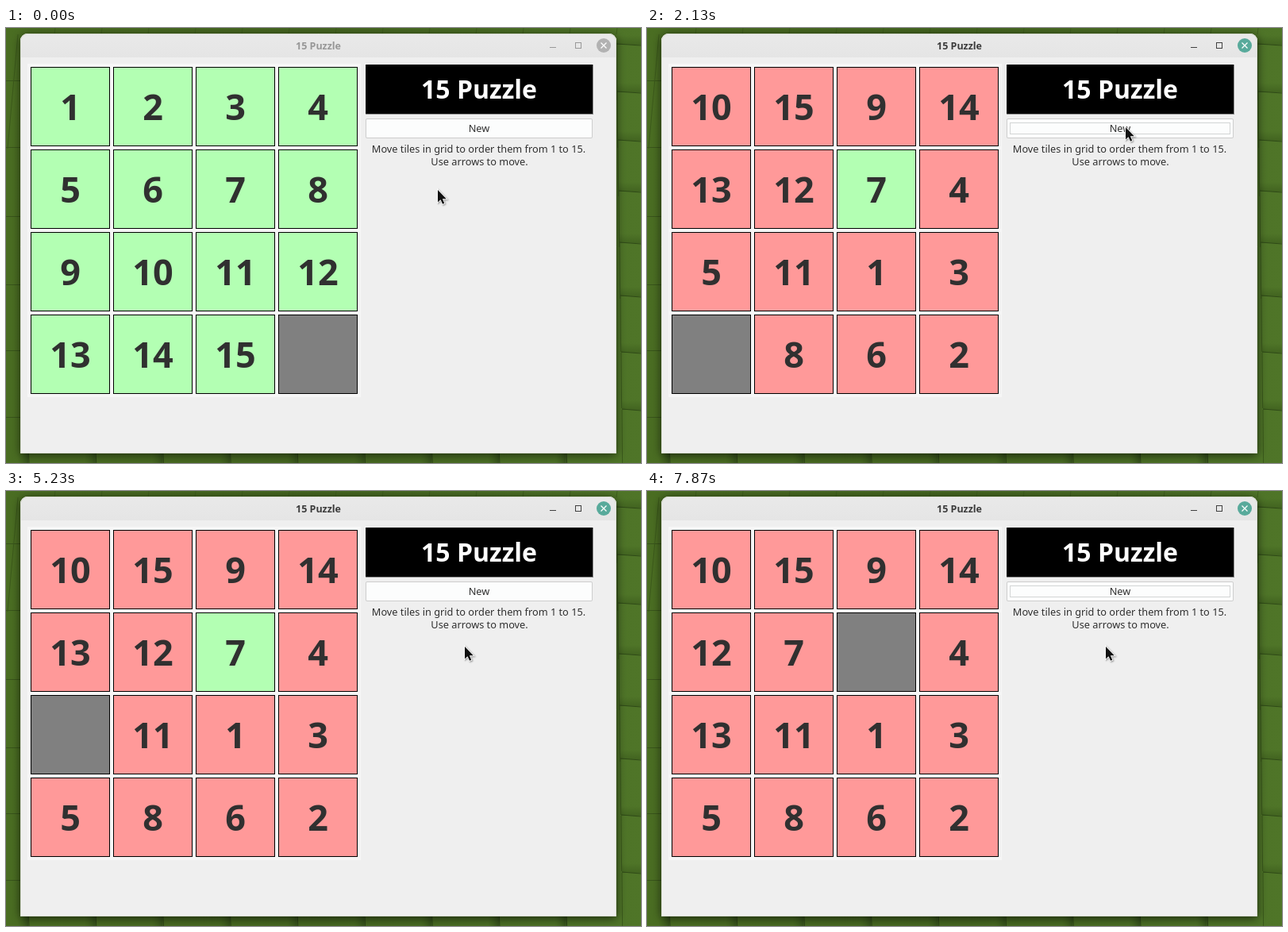
An HTML page with a canvas for the animation above (8 s loop, 800 by 548 pixels).

```html
<!DOCTYPE html>
<html lang="en">
<head>
<meta charset="utf-8">
<title>15 Puzzle</title>
<style>
  html, body { margin: 0; width: 100%; height: 100%; overflow: hidden; }
  canvas { display: block; }
</style>
</head>
<body>
<canvas id="stage" width="800" height="548"></canvas>
<script>
const ctx = document.getElementById('stage').getContext('2d');
const LOOP = 8000, ACTIVATE = 1970, SHUFFLE = 2130;
const FONT = '"Noto Sans", "Open Sans", sans-serif';

const SOLVED = [1, 2, 3, 4, 5, 6, 7, 8, 9, 10, 11, 12, 13, 14, 15, 0];
const SHUFFLED = [10, 15, 9, 14, 13, 12, 7, 4, 5, 11, 1, 3, 0, 8, 6, 2];
// Time of each move and the cell the gap goes to.
const MOVES = [[5230, 8], [6230, 4], [6830, 5], [7870, 6]];

// Pointer strokes: start time, end time, steps, from, to, easing.
const smooth = p => p * p * (3 - 2 * p);
const linear = p => p;
const STROKES = [
  [400, 870, 15, [543, 203], [599, 82], smooth],
  [1100, 1370, 9, [599, 82], [602, 124], linear],
  [2700, 2930, 7, [602, 124], [577, 195], smooth]
];

function rect(x, y, w, h, fill) {
  ctx.fillStyle = fill;
  ctx.fillRect(x, y, w, h);
}

function outline(x, y, w, h, color) {
  ctx.strokeStyle = color;
  ctx.lineWidth = 1;
  ctx.strokeRect(x + .5, y + .5, w - 1, h - 1);
}

function line(x1, y1, x2, y2, color, width = 1) {
  ctx.strokeStyle = color;
  ctx.lineWidth = width;
  ctx.beginPath();
  ctx.moveTo(x1, y1);
  ctx.lineTo(x2, y2);
  ctx.stroke();
}

function text(str, x, y, size, color, weight = 400) {
  ctx.font = `${weight} ${size}px ${FONT}`;
  ctx.textAlign = 'center';
  ctx.fillStyle = color;
  ctx.fillText(str, x, y);
}

function roundRect(x, y, w, h, radii, fill) {
  ctx.beginPath();
  ctx.roundRect(x, y, w, h, radii);
  ctx.fillStyle = fill;
  ctx.fill();
}

function gradient(x1, y1, x2, y2, ...colors) {
  const g = ctx.createLinearGradient(x1, y1, x2, y2);
  colors.forEach((c, i) => g.addColorStop(i / (colors.length - 1), c));
  return g;
}

function drawWallpaper() {
  rect(0, 0, 800, 548, gradient(0, 0, 800, 0, '#4a6d22', '#456620', '#4f7528'));
  [66, 150, 237, 323, 406, 490].forEach(y => line(0, y + .5, 20, y + .5, '#38541a'));
  line(15, 8, 2, 152, '#3c5a1b');
  for (let x = 28; x < 790; x += 84.7) {
    rect(x - 14, 534, 14, 14, gradient(x - 14, 0, x, 0, '#3f601d00', '#34501a'));
    line(x + .5, 534, x + 1, 548, '#2b4215');
  }
  for (let x = 62; x < 780; x += 59) line(x, 0, x - 1, 8, '#3f5f1d');
  [21, 81, 142, 206, 271, 338, 409, 481].forEach((y, i) => {
    const x = 769 + i;
    rect(x, y - 12, 800 - x, 12, gradient(0, y - 12, 0, y, '#426420' + '00', '#426420'));
    line(x, y - 1, 800, y + 1, '#2f4a17');
    line(x, y, x + .6, y + 70, '#3a591b');
  });
}

function drawWindow(active) {
  ctx.save();
  ctx.shadowColor = active ? '#000a' : '#0009';
  ctx.shadowBlur = 12;
  ctx.shadowOffsetY = 2;
  roundRect(18, 7, 751, 529, [9, 9, 1, 1], '#efefef');
  ctx.restore();
  roundRect(18, 7, 751, 30, [9, 9, 0, 0], gradient(0, 7, 0, 37, '#e9e9e9', '#e5e5e5'));
  ctx.beginPath();
  ctx.roundRect(18.5, 7.5, 750, 528, [9, 9, 1, 1]);
  ctx.strokeStyle = '#d6dacf';
  ctx.lineWidth = 1;
  ctx.stroke();

  const icon = active ? '#404040' : '#999';
  text('15 Puzzle', 393.5, 27, 12.5, active ? '#3c3c3c' : '#979797', 700);
  rect(685, 24, 8, 1, icon);
  outline(717, 18, 8, 8, icon);
  ctx.beginPath();
  ctx.arc(753, 22, 9, 0, 2 * Math.PI);
  ctx.fillStyle = active ? '#58aa9b' : '#b2b2b2';
  ctx.fill();
  line(749.5, 18.5, 756.5, 25.5, '#fff', 1.3);
  line(756.5, 18.5, 749.5, 25.5, '#fff', 1.3);
}

function drawPanel(pressed, focused) {
  rect(452, 45, 288, 64, '#fff');
  rect(453, 46, 287, 63, '#8a8a8a');
  rect(453, 46, 286, 62, '#000');
  text('15 Puzzle', 596, 89, 32, '#fff', 700);

  roundRect(453, 114, 286, 25, 2, pressed ? '#b5b7b7' : '#cdcdcd');
  roundRect(454, 115, 284, 23, 1, pressed ? '#d0d2d2' : '#fcfdfd');
  if (focused) outline(457, 119, 278, 15, '#d3d5d5');
  text('New', 596, 131, 12.75, '#303030');
  text('Move tiles in grid to order them from 1 to 15.', 595.5, 157, 12.75, '#303030');
  text('Use arrows to move.', 596.5, 173, 12.75, '#303030');
}

function boardAt(t) {
  if (t < SHUFFLE) return SOLVED;
  const board = [...SHUFFLED];
  for (const [time, cell] of MOVES) {
    if (t < time) break;
    board[board.indexOf(0)] = board[cell];
    board[cell] = 0;
  }
  return board;
}

function drawBoard(board) {
  rect(27, 45, 420, 420, '#f6f6f6');
  board.forEach((value, i) => {
    const x = 31 + 104 * (i % 4), y = 49 + 104 * Math.floor(i / 4);
    rect(x, y, 100, 100, !value ? '#808080' : value === i + 1 ? '#b3ffb3' : '#ff9999');
    outline(x, y, 100, 100, '#000');
    if (value) text(value, x + 50, y + 67, 45, '#303030', 700);
  });
}

function pointerAt(t) {
  let pos = STROKES[0][3];
  for (const [start, end, steps, from, to, ease] of STROKES) {
    if (t < start) break;
    const step = Math.floor((t - start) / (end - start) * (steps - 1) + .001) + 1;
    const p = ease(Math.min(1, step / steps));
    pos = from.map((a, i) => Math.round(a + (to[i] - a) * p));
  }
  return pos;
}

function drawPointer([x, y]) {
  ctx.save();
  ctx.translate(x + 1, y + 1);
  ctx.lineJoin = 'miter';
  const arrow = new Path2D('M0 0V15.5L3.5 12.2L6 17.8L8.3 16.8L5.9 11.3H10.8Z');
  ctx.shadowColor = '#0006';
  ctx.shadowBlur = 2;
  ctx.shadowOffsetX = ctx.shadowOffsetY = 1;
  ctx.strokeStyle = '#fff';
  ctx.lineWidth = 1.8;
  ctx.stroke(arrow);
  ctx.shadowColor = 'transparent';
  ctx.fillStyle = '#111';
  ctx.fill(arrow);
  ctx.restore();
}

function draw(now) {
  const t = now % LOOP;
  drawWallpaper();
  drawWindow(t >= ACTIVATE);
  drawBoard(boardAt(t));
  drawPanel(t >= ACTIVATE && t < SHUFFLE, t >= SHUFFLE && t < 5000 || t >= 7670);
  drawPointer(pointerAt(t));
}

const began = performance.now();
function frame() {
  draw(performance.now() - began);
  requestAnimationFrame(frame);
}
frame();
</script>
</body>
</html>
```
